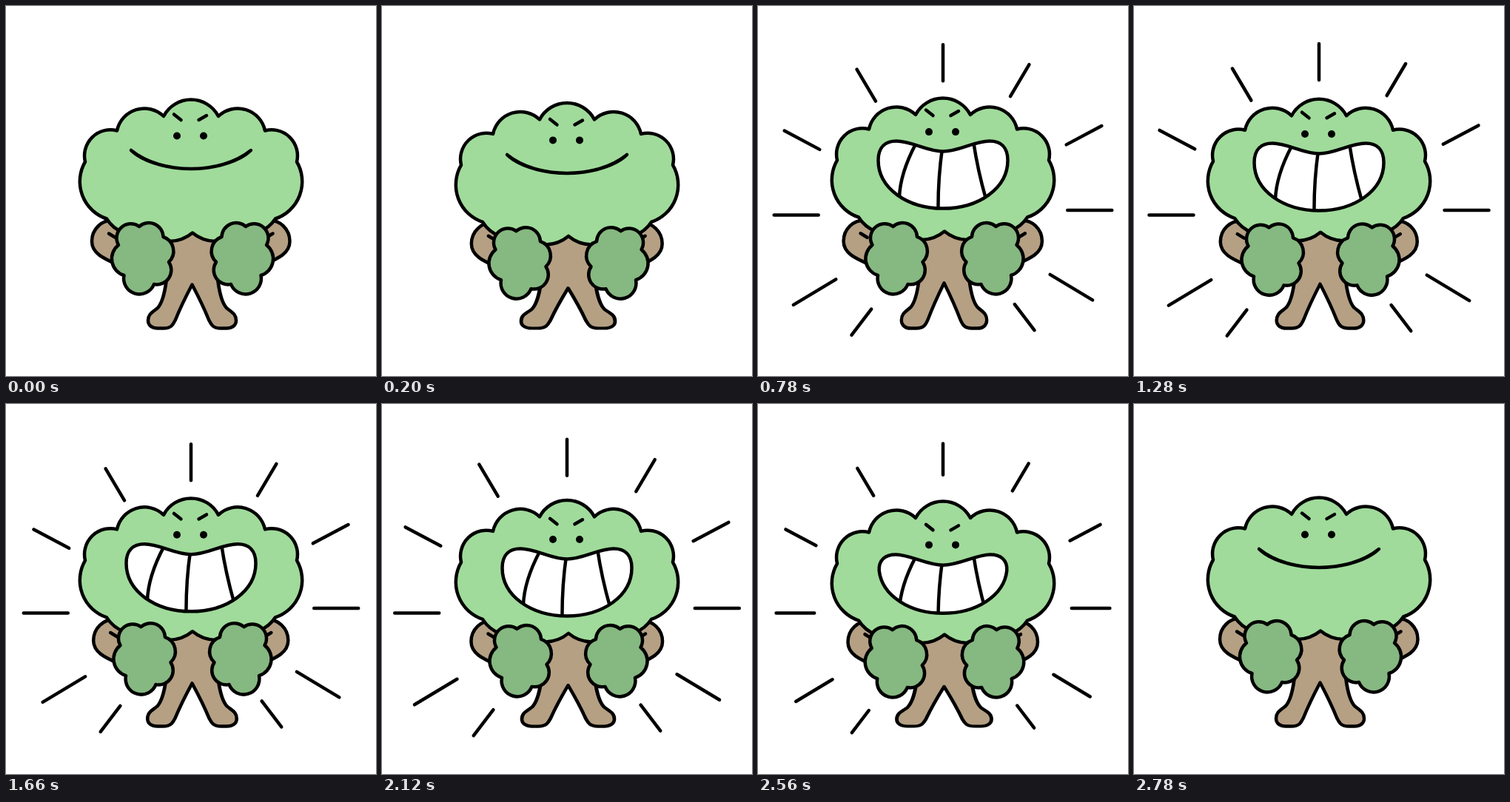
Animation, 500 px wide and 500 px high, one loop 3000 ms. Source, as an HTML page:

```html
<!DOCTYPE html>
<html lang="en">
<head>
<meta charset="utf-8">
<title>Grinning tree</title>
<style>
  html, body { margin: 0; width: 100%; height: 100%; overflow: hidden; background: #fff; }
  svg { display: block; width: 100%; height: 100%; }
  .line { fill: none; }
  .bark { fill: #b5a084; }
  .crown { fill: #a0db9b; }
  .leaf { fill: #86b881; }
</style>
</head>
<body>
<svg viewBox="0 0 500 500" stroke="#000" stroke-width="4.5" stroke-linecap="round" stroke-linejoin="round">
  <defs>
    <g id="arm">
      <path class="bark" d="M175 290H150C128 287 116 303 116 318C116 334 131 341 152 350H175Z"/>
      <path class="line" d="M139 307.5L148 313"/>
    </g>
    <path id="hand" class="leaf" d="M180 298A19.5 19.5 0 0 1 212.5 312A20.3 20.3 0 0 1 220 346A19.5 19.5 0 0 1 200 376A21.2 21.2 0 0 1 159.5 364A23.5 23.5 0 0 1 152 323A19.2 19.2 0 0 1 180 298Z"/>
    <path id="mouth"/>
    <clipPath id="inside"><use href="#mouth"/></clipPath>
  </defs>
  <path id="rays" class="line"/>
  <path id="trunk" class="bark" d="M220 300C220 360 216 396 205 408C198 414 192 416 192 425C192 432 198 435.5 205 435.5H213C224 435.5 226 430 229 424Q237 404 251.5 376.5Q266 404 274 424C277 430 279 435.5 290 435.5H298C305 435.5 311 432 311 425C311 416 305 414 298 408C287 396 283 360 283 300Z"/>
  <use id="armL" href="#arm"/>
  <use id="armR" href="#arm"/>
  <path id="crown" class="crown" d="M252 306.5A50 50 0 0 1 190 308A48 48 0 0 1 136 287.5A53 53 0 0 1 107 210.5A35 35 0 0 1 150 168.5A37.7 37.7 0 0 1 213 149A41.7 41.7 0 0 1 287 149A37.7 37.7 0 0 1 350 168.5A35 35 0 0 1 393 210.5A53 53 0 0 1 364 287.5A48 48 0 0 1 314 308A50 50 0 0 1 252 306.5Z"/>
  <use id="handL" href="#hand"/>
  <use id="handR" href="#hand"/>
  <path id="brows" class="line" d="M227 146.5L236.5 154M271 148L260.5 154"/>
  <g id="face">
    <g stroke="none"><circle cx="231" cy="175.5" r="5"/><circle cx="267" cy="175.5" r="5"/></g>
    <use href="#mouth" fill="#fff" stroke="none"/>
    <path class="line" clip-path="url(#inside)" d="M213 192Q192 232 191 264M249 198Q243 240 243.5 284M291 188Q297 228 308 266"/>
    <use href="#mouth" fill="none"/>
  </g>
</svg>
<script>
const LOOP = 3000;
const el = Object.fromEntries([...document.querySelectorAll('svg [id]')].map(n => [n.id, n]));

// angle, inner radius, length; each is repeated on the other side
const SPOKES = [[59.4, 180, 50], [28, 190, 54], [0, 169.5, 60], [-31, 170, 67], [-52.7, 161, 44]];

// left half of the mouth, closed and wide open
const UPPER = [
  [[169, 195], [172, 198], [177, 201.5], [194, 213], [223, 220], [250, 220]],
  [[162.5, 196], [172, 188], [187, 188], [208, 188], [228, 202], [250, 202]]
];
const LOWER = [
  [[220, 220], [190, 212], [169, 195]],
  [[202, 279], [162.5, 252], [162.5, 214]]
];
const CHIN = [220, 279];

const mix = (a, b, k) => a + (b - a) * k;
const ramp = (t, a, b) => Math.max(0, Math.min(1, (t - a) / (b - a)));
const smooth = u => u * u * (3 - 2 * u);
const hold = (t, a, b, c, d) => smooth(ramp(t, a, b)) - smooth(ramp(t, c, d));
const pt = p => p.map(v => v.toFixed(2)).join(' ');

// crouch, spring up, sink slowly, come back to rest
function bodyDrop(t) {
  return 7 * smooth(ramp(t, 0, 340))
    - 9.2 * smooth(ramp(t, 340, 580))
    + 8.1 * ramp(t, 580, 2500) ** 1.7
    - 5.9 * smooth(ramp(t, 2500, 2750));
}

function raysPath(t) {
  const grow = ramp(t, 394, 576) - ramp(t, 2540, 2690);
  if (grow <= 0) return '';
  const shift = -4.5 * Math.cos((t - 1840) * 2 * Math.PI / 203.4);
  const ray = (side, cy, [angle, inner, length]) => {
    const a = angle * Math.PI / 180;
    const at = r => pt([250 + side * r * Math.cos(a), cy - r * Math.sin(a)]);
    return `M${at(inner + shift)}L${at(inner + shift + length * grow)}`;
  };
  return ray(1, 276, [90, 176, 49])
    + SPOKES.map(s => ray(1, 276, s) + ray(-1, 282.5, s)).join('');
}

// the upper lip opens ahead of the lower one
function mouthPath(open) {
  const blend = ([a, b], k) => a.map((p, i) => p.map((v, j) => mix(v, b[i][j], k)));
  const flip = pts => pts.map(([x, y]) => [500 - x, y]).reverse();
  const upper = blend(UPPER, open ** 0.25), lower = blend(LOWER, open);
  const corner = lower[2], chin = [250, mix(...CHIN, open)];
  const right = flip([corner, ...upper.slice(0, -1)]);
  const curve = [...upper, ...right, ...flip(lower.slice(0, 2)), chin, ...lower];
  return `M${pt(corner)}C${curve.map(pt).join(' ')}Z`;
}

function place(node, x, y, mirror) {
  node.setAttribute('transform', mirror
    ? `translate(${mirror - x} ${y}) scale(-1 1)` : `translate(${x} ${y})`);
}

function draw(t) {
  const drop = bodyDrop(t), face = 2.55 * bodyDrop(t - 70);
  const pull = hold(t, 0, 360, 2450, 2760);

  el.rays.setAttribute('d', raysPath(t));
  el.trunk.setAttribute('transform',
    `translate(251.5 436) scale(${1 + 0.015 * drop} ${1 - 0.018 * drop}) translate(-251.5 -436)`);
  place(el.crown, 0, drop);
  place(el.face, 0, face);
  place(el.brows, 0, face * 1.1);

  const armX = 0.9 * drop + 1.4 * pull, armY = 0.6 * drop + pull;
  place(el.armL, armX, armY);
  place(el.armR, armX, armY, 499.5);
  const handX = 2.5 * pull, handY = 1.1 * drop + 2.2 * pull;
  place(el.handL, handX, handY);
  place(el.handR, handX, handY, 504);

  el.mouth.setAttribute('d', mouthPath(hold(t, 360, 580, 2500, 2720)));
}

const start = performance.now();
function tick() {
  draw((performance.now() - start) % LOOP);
  requestAnimationFrame(tick);
}
tick();
</script>
</body>
</html>
```
